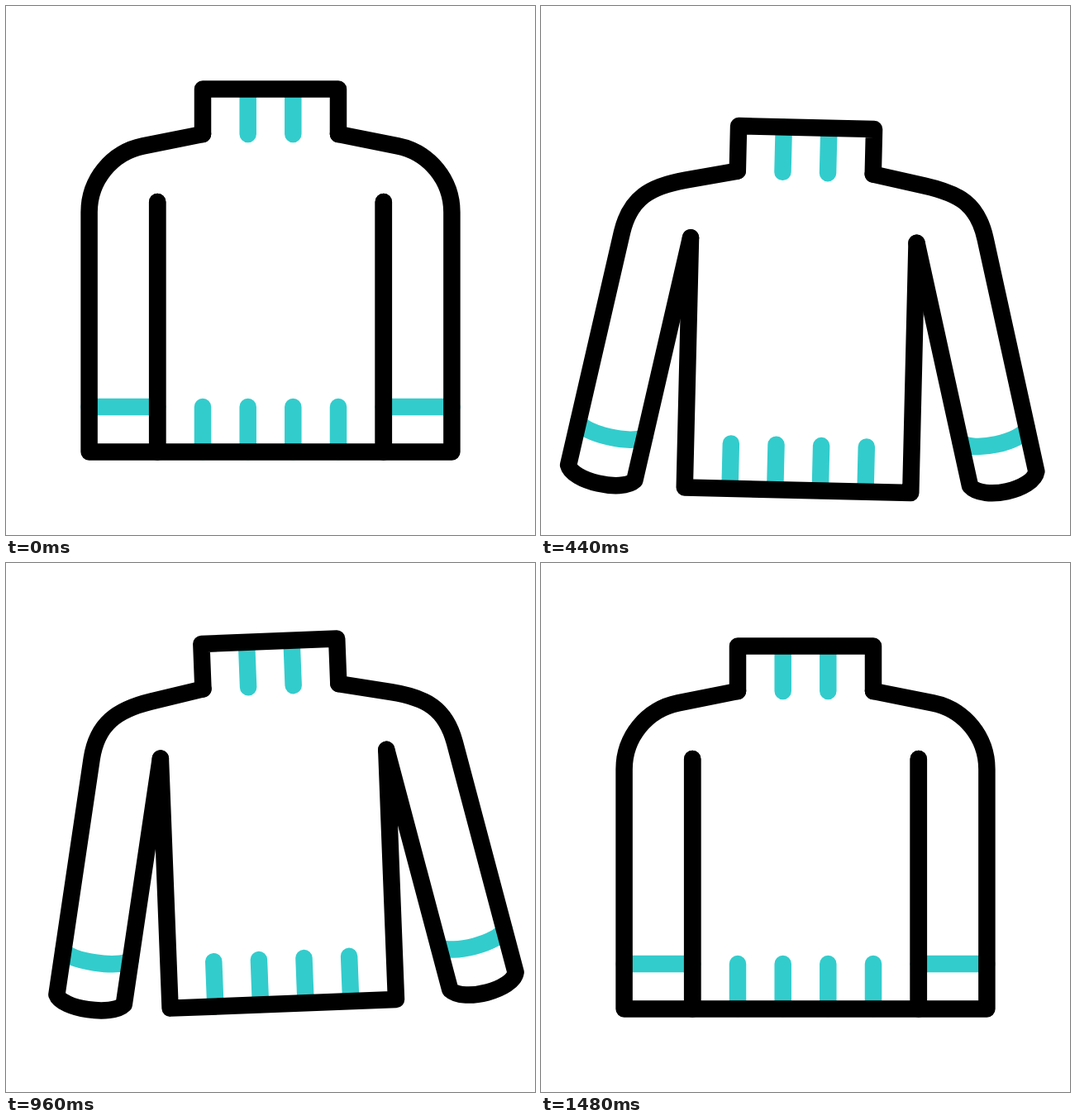
Write an HTML page that moves like this. It is 640 px wide and 640 px high and loops after 2400 ms.

```html
<!DOCTYPE html>
<html lang="en">
<head>
<meta charset="utf-8">
<title>Sweater</title>
<style>
  html, body { margin: 0; width: 100%; height: 100%; overflow: hidden; background: #fff; }
  svg { display: block; width: 100vw; height: 100vh; }
  path { fill: none; stroke-width: 20.5; stroke-linecap: round; stroke-linejoin: round; }
  .rib { stroke: #33cccc; }
  .line { stroke: #000; }
</style>
</head>
<body>
<svg viewBox="0 0 640 640">
  <g id="sweater">
    <path class="rib" d="M292.7 101V155M347.3 101V155M238 485V539M292.7 485V539M347.3 485V539M402 485V539"/>
    <g class="side"><path class="rib"/><path class="line"/></g>
    <g class="side" transform="translate(640) scale(-1 1)"><path class="rib"/><path class="line"/></g>
    <path class="line" d="M238 155V100.5H402V155M183.2 237V539.4H456.8V237"/>
  </g>
</svg>
<script>
const LOOP = 2400;
// [time, drop, tilt]
const BODY = [[0, 0, 0], [374, 54.5, 1.95], [785, -57.9, -6.1], [1156, 55, 2.3], [1470, 0, 0]];
// [time, spread]
const ARMS = [[0, 0], [357, 1], [712, 0], [1066, 1], [1443, 0]];
const SPREAD = [13.5, 16];

const sweater = document.getElementById('sweater');
const sides = [...document.querySelectorAll('.side')].map(g => g.children);

function sample(keys, t) {
  const i = keys.findIndex(k => k[0] > t);
  if (i < 0) return keys[keys.length - 1].slice(1);
  const a = keys[i - 1], b = keys[i];
  const x = (t - a[0]) / (b[0] - a[0]);
  const e = x * x * (3 - 2 * x);
  return a.slice(1).map((v, n) => v + (b[n + 1] - v) * e);
}

// Left sleeve, morphed from hanging to swung around the armpit; the right one is mirrored.
function drawSleeve([band, line], s, degrees) {
  const a = degrees * Math.PI / 180;
  const cos = Math.cos(a), sin = Math.sin(a);
  // Blends a hanging point with its swung place; sag lowers the swung one.
  const at = (x, y, sag = 0) => {
    const dx = x - 183.2, dy = y - 237, low = dy + sag;
    const px = 183.2 + dx + s * (dx * cos - low * sin - dx);
    const py = 237 + dy + s * (dx * sin + low * cos - dy);
    return `${px.toFixed(2)} ${py.toFixed(2)}`;
  };
  const curve = (y, sag) => `C${at(110, y, sag)} ${at(172, y, sag)} ${at(183.2, y)}`;
  const sag = degrees * 1.55;
  const k = 38.9 + 5 * s;
  const sx = 166 + 11 * s, sy = 169.4 - 2.2 * s;

  band.setAttribute('d', `M${at(100.6, 485)}${curve(485, sag * 0.74)}`);
  line.setAttribute('d',
    `M238 155L${sx} ${sy}C${sx - k * 0.98} ${sy + k * 0.197} ${at(100.6, 210.7, -5)} ${at(100.6, 249.6)}` +
    `L${at(100.6, 539.4)}${curve(539.4, sag)}L${at(183.2, 237)}`);
}

function draw(t) {
  const [drop, tilt] = sample(BODY, t);
  const [spread] = sample(ARMS, t);
  sweater.setAttribute('transform', `translate(0 ${drop}) rotate(${tilt} 320 145)`);
  sides.forEach((side, i) => drawSleeve(side, spread, SPREAD[i]));
}

function tick() {
  draw(performance.now() % LOOP);
  requestAnimationFrame(tick);
}
draw(0);
requestAnimationFrame(tick);
</script>
</body>
</html>
```
